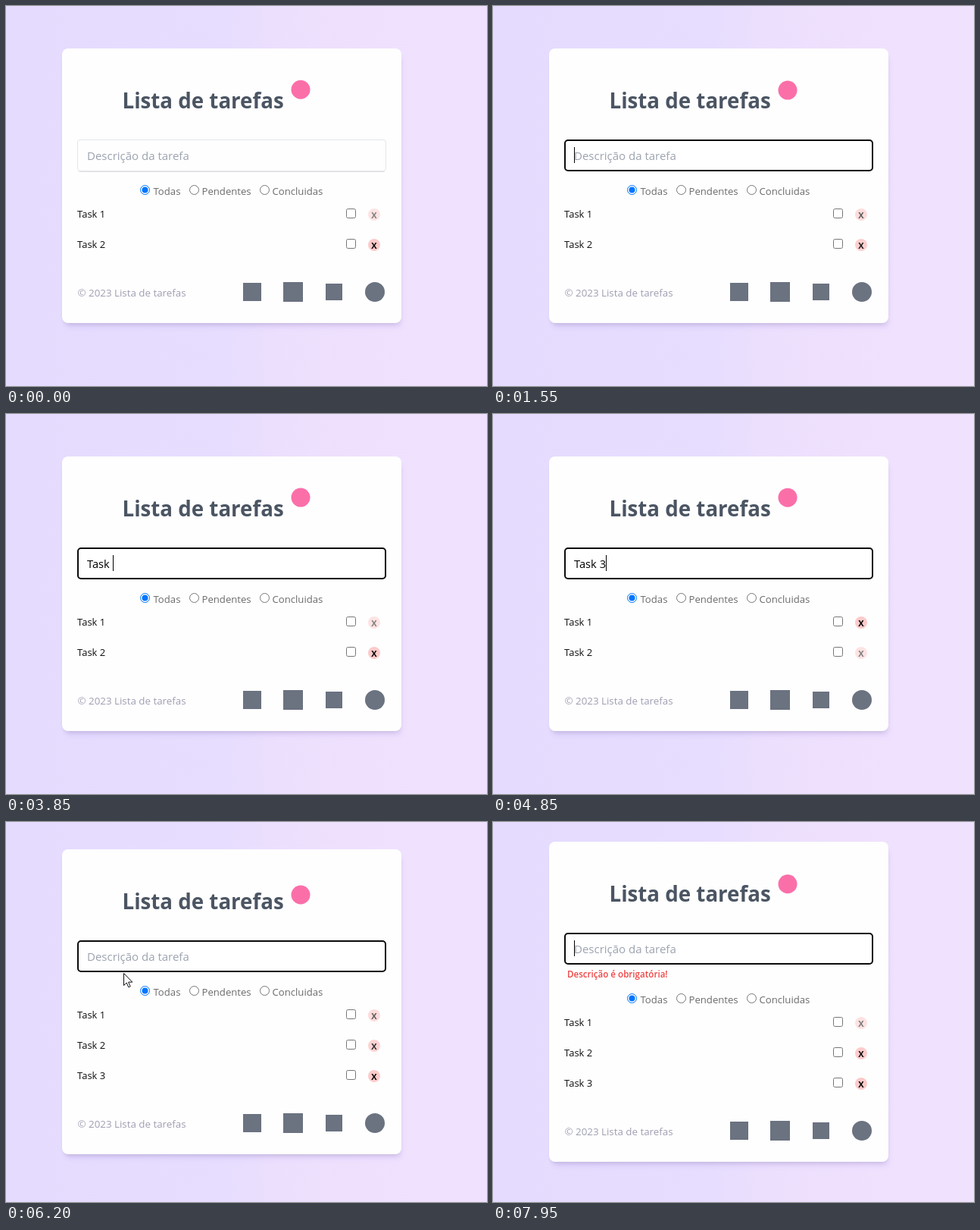
Write an HTML page that moves like this. It is 635 px wide and 501 px high and loops after 8000 ms.

```html
<!DOCTYPE html>
<html lang="pt">
<head>
<meta charset="utf-8">
<title>Lista de tarefas</title>
<style>
  html, body { margin: 0; width: 100%; height: 100%; overflow: hidden; }
  body { position: relative; background: linear-gradient(90deg, #e5dbfe, #e7ddfe 46%, #ecdffd 56%, #f0e2fe 85%); }
  #card { position: absolute; left: 74px; width: 448px; background: #fefefe; border-radius: 8px;
    box-shadow: 3px 8px 6px -2px rgba(120, 90, 220, .1), 0 4px 6px -4px rgba(0, 0, 0, .2); }
  svg { position: absolute; left: 0; top: 0; }
  text { font: 13px "Open Sans", "Noto Sans", sans-serif; white-space: pre; }
  .title { font-size: 27.7px; font-weight: 700; fill: #4b5563; }
  .field { font-size: 15px; fill: #000; }
  .typed { font-size: 14.7px; }
  .hint { fill: #9ca3af; }
  .label { font-size: 13.15px; fill: #6b6b6b; }
  .foot { font-size: 13.35px; fill: #9e9fb2; }
  .error { font-size: 11.6px; font-weight: 600; fill: #ef4444; }
  .remove { font-size: 11px; font-weight: 700; text-anchor: middle; }
  .box { fill: #fff; stroke: #767676; }
</style>
</head>
<body>
<div id="card"></div>
<svg width="635" height="501" viewBox="0 0 635 501">
  <g id="head">
    <text class="title" x="153.5" y="135">Lista de tarefas</text>
    <circle id="bouncer" cx="389" r="12.5" fill="#fb6fa9"/>
    <g id="idle" fill="none">
      <path d="M96 218.5H500" stroke="#e0e1e6"/>
      <rect x="94.5" y="176.5" width="407" height="41" rx="3.5" stroke="#e3e5e9"/>
    </g>
    <rect id="focus" x="95" y="177" width="406" height="40" rx="4" fill="#fff" stroke="#0b0b0d" stroke-width="2"/>
    <text id="hint" class="field hint" x="107" y="203">Descrição da tarefa</text>
    <text id="typed" class="field typed" x="107" y="203"></text>
    <rect id="caret" y="186" width="1" height="21"/>
    <text id="error" class="error" x="98" y="235">Descrição é obrigatória!</text>
  </g>
  <g id="list"></g>
  <g id="foot" fill="#6b7280">
    <text class="foot" x="94.5" y="383">© 2023 Lista de tarefas</text>
    <rect x="313" y="365" width="24" height="24"/>
    <rect x="366" y="364" width="26" height="26"/>
    <rect x="422" y="366" width="22" height="22"/>
    <circle cx="487" cy="377" r="13"/>
  </g>
  <path id="pointer" d="M155.5 199.5v16l3.7-3.5 2.6 5.8 2.4-1-2.6-5.7h5.2z" fill="#fff" stroke="#111"/>
</svg>
<script>
const LOOP = 8000, FOCUS = 1200, CLEAR = 5650, ADDED = 6080, INVALID = 7400, POINTER_GONE = 7880;
const BLINK = 530, BOUNCE = 975, PULSE = 1970;
const keys = [["T", 2450], ["a", 2650], ["s", 2900], ["k", 3150], [" ", 3700], ["3", 4600]];
const peaks = [920, -120, ADDED];   // moments when each remove button is fully opaque

const $ = id => document.getElementById(id);
const show = (id, on) => $(id).setAttribute("visibility", on ? "visible" : "hidden");
const shift = (id, y) => $(id).setAttribute("transform", `translate(0 ${y})`);

const radio = (x, labelX, label, checked) => `
  <circle class="box" cx="${x}" cy="242.5" r="6" ${checked ? 'style="stroke:#0075ff"' : ""}/>
  ${checked ? `<circle cx="${x}" cy="242.5" r="4" fill="#0075ff"/>` : ""}
  <text class="label" x="${labelX}" y="249">${label}</text>`;

const row = i => `
  <g id="row${i}" transform="translate(0 ${i * 40})">
    <text x="94" y="279" fill="#111">Task ${i + 1}</text>
    <rect class="box" x="449.5" y="267.5" width="12" height="12" rx="2"/>
    <g id="remove${i}">
      <circle cx="486" cy="275" r="8" fill="#fecaca"/>
      <text class="remove" x="486" y="279.6">X</text>
    </g>
  </g>`;

$("list").innerHTML = radio(183.5, 194.5, "Todas", true) + radio(248.5, 258.5, "Pendentes")
  + radio(341.5, 351.5, "Concluidas") + peaks.map((_, i) => row(i)).join("");

function drawLayout(t) {
  const added = t >= ADDED ? 40 : 0, invalid = t >= INVALID ? 20 : 0;
  const lift = -(added + invalid) / 2;
  $("card").style.top = 56 + lift + "px";
  $("card").style.height = 362 + added + invalid + "px";
  shift("head", lift);
  shift("list", lift + invalid);
  shift("foot", lift + invalid + added);
  show("row2", added);
  show("remove2", added);
  show("error", invalid);
  show("pointer", added && t < POINTER_GONE);
}

function drawField(t) {
  const pressed = t < CLEAR ? keys.filter(([, at]) => t >= at) : [];
  const value = pressed.map(([key]) => key).join("");
  const lastInput = t >= CLEAR ? CLEAR : pressed.length ? pressed[pressed.length - 1][1] : FOCUS;
  const focused = t >= FOCUS;
  $("typed").textContent = value;
  $("caret").setAttribute("x", Math.round(107 + (value ? $("typed").getComputedTextLength() : 0)));
  show("hint", !value);
  show("idle", !focused);
  show("focus", focused);
  show("caret", focused && Math.floor((t - lastInput) / BLINK) % 2 === 0);
}

function drawPulses(t) {
  const phase = ((t + 150) % BOUNCE) / BOUNCE;
  const drop = (1 - Math.abs(2 * phase - 1)) ** 2.7;
  $("bouncer").setAttribute("cy", 110 + 6.5 * drop);
  peaks.forEach((peak, i) =>
    $("remove" + i).setAttribute("opacity", 0.75 + 0.25 * Math.cos(2 * Math.PI * (t - peak) / PULSE)));
}

function frame(now) {
  const t = now % LOOP;
  drawLayout(t);
  drawField(t);
  drawPulses(t);
  requestAnimationFrame(frame);
}
frame(0);
</script>
</body>
</html>
```
